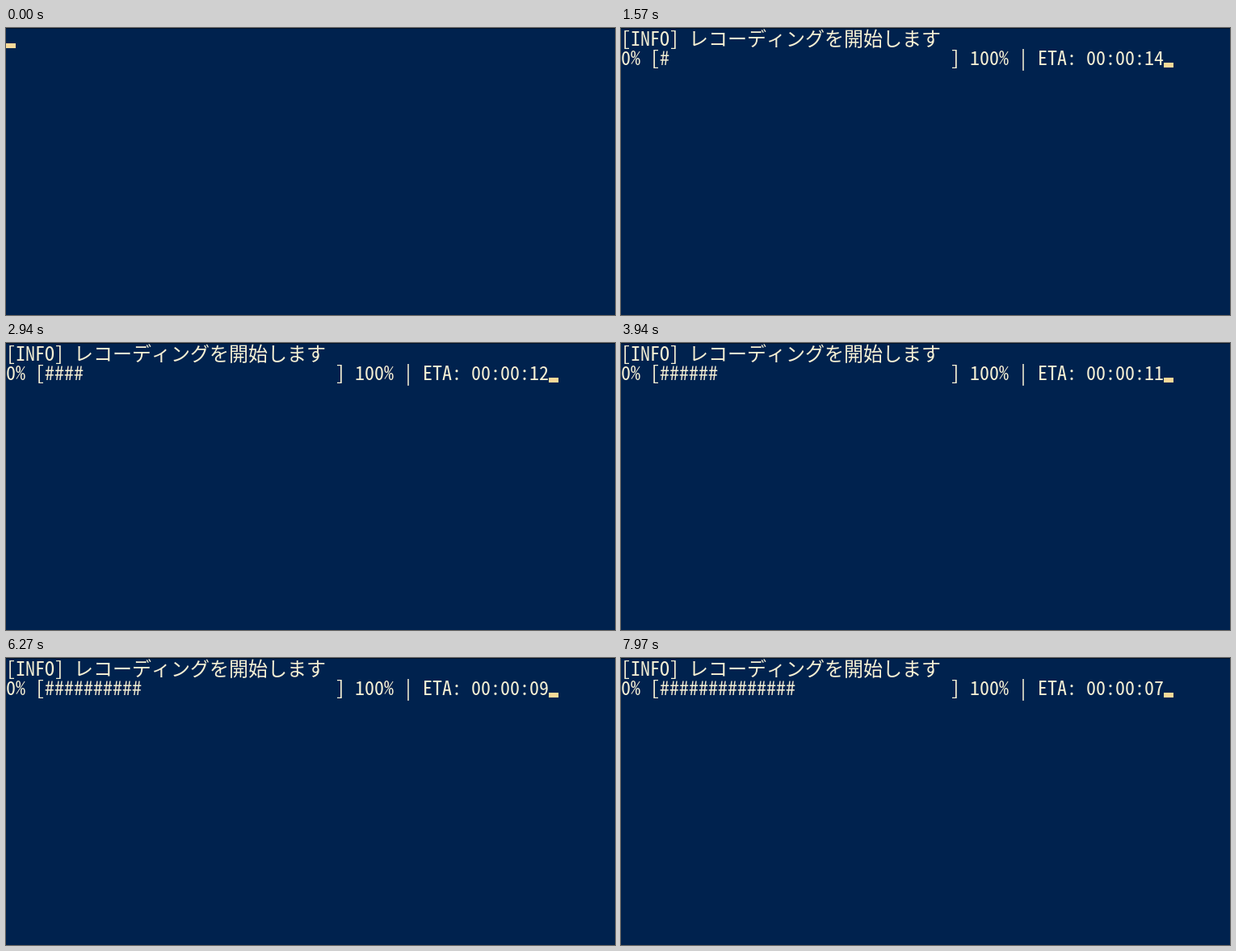
Animation, 754 px wide and 356 px high, one loop 8 s. Source, as an HTML page with a canvas:

```html
<!DOCTYPE html>
<html lang="ja">
<head>
<meta charset="utf-8">
<title>Terminal progress</title>
<style>
  html, body { margin: 0; width: 100%; height: 100%; overflow: hidden; background: #00224e; }
  canvas { display: block; }
</style>
</head>
<body>
<canvas id="term" width="754" height="356"></canvas>
<script>
const ctx = document.getElementById('term').getContext('2d');
const LOOP = 8000, CELL = 12, ROW = 24, TOP = 1;
const BACK = '#00224e', EDGE = '#00122a', INK = '#f6f0d4', CURSOR = '#fbd999';
const BAR_SIZE = 30, INFO_AT = 770;
const TICKS = [1300, 1740, 2270, 2770, 3270, 3770, 4270, 4740,
               5270, 5740, 6310, 6810, 7310, 7810];

// Prints on the character grid and returns the column after the text.
function print(text, row) {
  let col = 0;
  ctx.fillStyle = INK;
  for (const ch of text) {
    const span = ch.charCodeAt(0) > 255 ? 2 : 1;
    ctx.fillText(ch, (col + span / 2) * CELL, TOP + row * ROW + 21);
    col += span;
  }
  return col;
}

function drawCursor(col, row) {
  ctx.fillStyle = CURSOR;
  ctx.fillRect(col * CELL, TOP + row * ROW + 18, CELL, 6);
}

function barText(done) {
  const eta = done < 3 ? 14 : Math.ceil((BAR_SIZE - done) / 2) - 1;
  const bar = '#'.repeat(done).padEnd(BAR_SIZE);
  return `0% [${bar}] 100% | ETA: 00:00:${String(eta).padStart(2, '0')}`;
}

function draw(t) {
  ctx.fillStyle = BACK;
  ctx.fillRect(0, 0, 754, 356);
  ctx.fillStyle = EDGE;
  ctx.fillRect(0, 0, 754, 1);
  ctx.font = '24px "Noto Sans Mono CJK JP", "Noto Sans CJK JP", "Noto Sans CJK", monospace';
  ctx.textAlign = 'center';

  if (t < INFO_AT) {
    if (t < 100 || t >= 600) drawCursor(0, 0);
    return;
  }
  print('[INFO] レコーディングを開始します', 0);
  const done = TICKS.filter(at => t >= at).length;
  drawCursor(done ? print(barText(done), 1) : 0, 1);
}

const start = performance.now();
function frame() {
  draw((performance.now() - start) % LOOP);
  requestAnimationFrame(frame);
}
frame();
</script>
</body>
</html>
```
